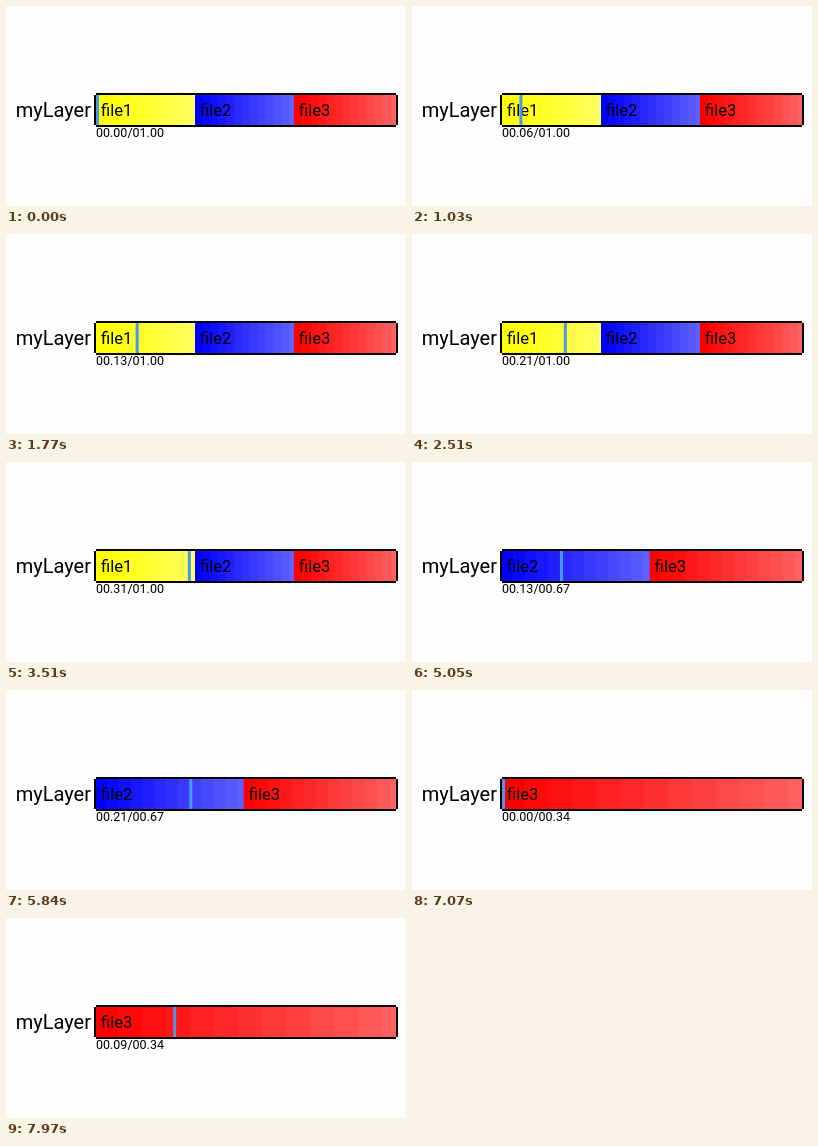
Write an HTML page with a canvas that moves like this. It is 400 px wide and 200 px high and loops after 8 s.

```html
<!DOCTYPE html>
<html lang="en">
<head>
<meta charset="utf-8">
<title>Layer timeline</title>
<style>
  html, body { margin: 0; width: 100%; height: 100%; overflow: hidden; background: #fefefe; }
  canvas { display: block; }
</style>
</head>
<body>
<canvas id="stage" width="400" height="200"></canvas>
<script>
const ctx = document.getElementById('stage').getContext('2d');
const LOOP = 8000;
const BAR = { x: 90, y: 89, w: 300, h: 30 };

const files = [
  { name: 'file1', length: 0.33, color: v => `rgb(255,255,${v})` },
  { name: 'file2', length: 0.33, color: v => `rgb(${v},${v},255)` },
  { name: 'file3', length: 0.34, color: v => `rgb(255,${v},${v})` }
];

// Each phase plays the first remaining file; `zero` is when its playhead leaves the start.
const phases = [
  { from: 0, zero: 450 },
  { from: 3740, zero: 3757 },
  { from: 7060, zero: 7097 }
];

function rect(color, x, y, w, h) {
  ctx.fillStyle = color;
  ctx.fillRect(x, y, w, h);
}

function text(string, size, x, y, align = 'left') {
  ctx.font = `${size}px Roboto, sans-serif`;
  ctx.textAlign = align;
  ctx.fillStyle = '#000';
  ctx.fillText(string, x, y);
}

// Gradient towards white in visible steps of 8 colour levels.
function drawFile(file, x, w) {
  for (let band = 0; band <= 12; band++) {
    const start = band ? (band * 8 - 0.6) / 100 * w : 0;
    rect(file.color(band * 8), x + start, BAR.y, w - start, BAR.h);
  }
  text(file.name, 16.67, x + 5, 110);
}

function drawBorder() {
  const { x, y, w, h } = BAR;
  rect('#000', x, y - 2, w, 2);
  rect('#000', x, y + h, w, 2);
  rect('#000', x - 2, y, 2, h);
  rect('#000', x + w, y, 2, h);
}

const seconds = v => v.toFixed(2).padStart(5, '0');

function draw(t) {
  const index = phases.findLastIndex(phase => t >= phase.from);
  const queue = files.slice(index);
  const total = queue.reduce((sum, file) => sum + file.length, 0);
  const position = t < 500 ? 0 : Math.max(0, t - phases[index].zero) / 10000;
  const scale = BAR.w / total;

  rect('#fefefe', 0, 0, 400, 200);
  let x = BAR.x;
  for (const file of queue) {
    const w = file.length * scale;
    drawFile(file, x, w);
    x += w;
  }
  drawBorder();
  rect('#4a98ee', BAR.x + position * scale, BAR.y, 3, BAR.h);
  text('myLayer', 20, 85, 111, 'right');
  text(`${seconds(position)}/${seconds(total)}`, 12.5, 90, 131);
}

function frame() {
  draw(performance.now() % LOOP);
  requestAnimationFrame(frame);
}
frame();
</script>
</body>
</html>
```
